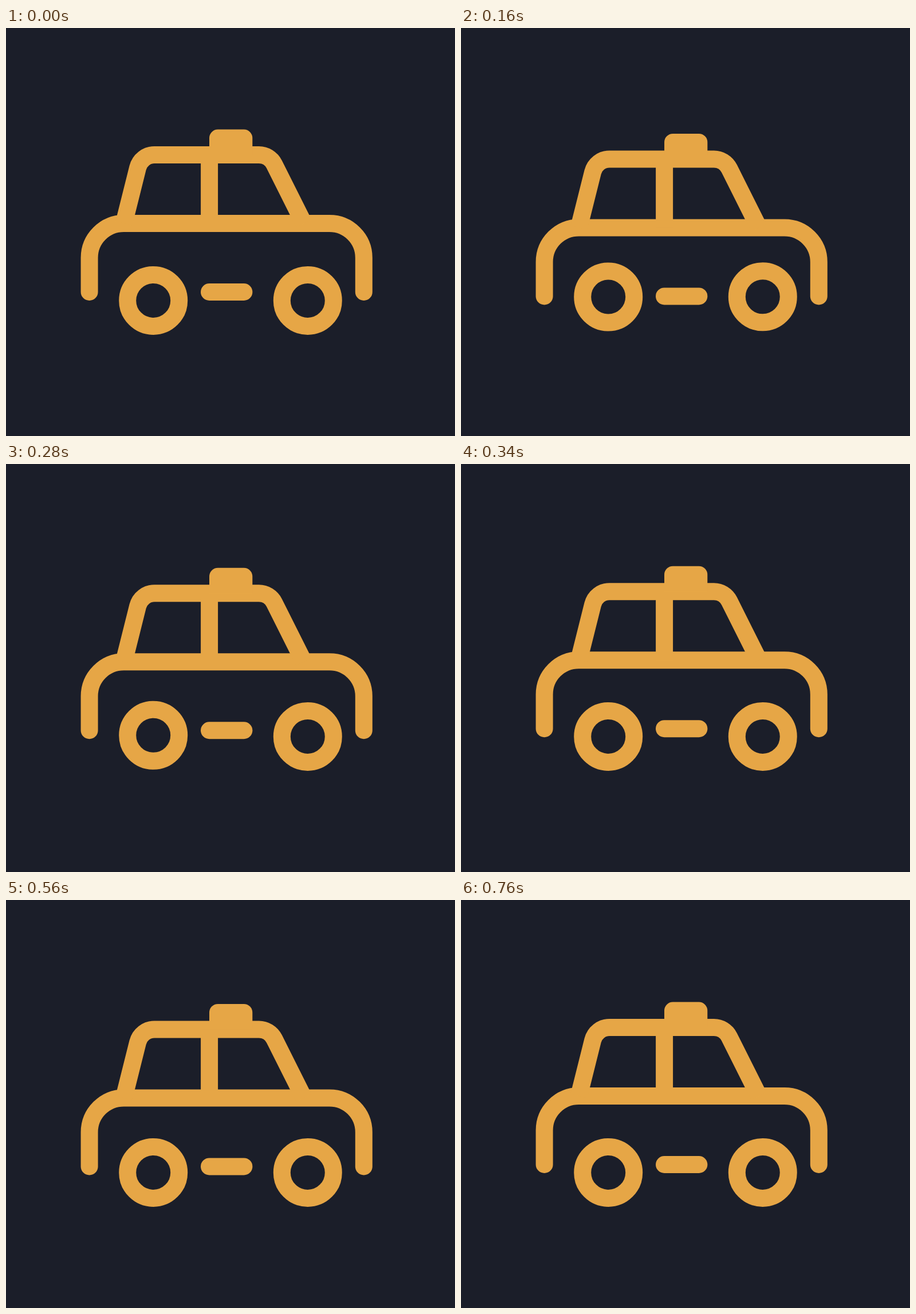
These frames come from a looping animation (784x714 px, 1.18 s). An HTML page:

```html
<!DOCTYPE html>
<html lang="en">
<head>
<meta charset="utf-8">
<title>Taxi</title>
<style>
  html, body { margin: 0; width: 100%; height: 100%; overflow: hidden; background: #1b1e29; }
  svg { display: block; width: 100%; height: 100%; }
  .line { fill: none; stroke: #e6a646; stroke-width: 30; }
  .round { stroke-linecap: round; }
  .lamp { fill: #e6a646; }
  #body { transform-origin: 385px 383px; }
</style>
</head>
<body>
<svg viewBox="0 0 784 714">
  <g id="body">
    <path class="line round" d="M145.6 462V402A60 60 0 0 1 205.6 342H564.8A60 60 0 0 1 624.8 402V462"/>
    <path class="line" d="M205.8 342L230.1 244.7A30 30 0 0 1 259.2 222H441.6A30 30 0 0 1 468.4 238.6L520.1 342"/>
    <path class="line" d="M355.1 222V342"/>
    <path class="line round" d="M355 462H415.4"/>
    <path class="lamp" d="M355 222V192.5A15 15 0 0 1 370 177.5H415.3A15 15 0 0 1 430.3 192.5V222Z"/>
  </g>
  <circle id="rear" class="line" cx="257.2" cy="476.9" r="45"/>
  <circle id="front" class="line" cx="526.8" cy="476.9" r="45"/>
</svg>
<script>
  const LOOP = 1180;
  const EASE = 'cubic-bezier(.333, 0, .667, 1)';

  // steps: [time in ms, value]; the last value holds until the loop restarts
  function move(id, prop, format, steps) {
    const held = [...steps, [LOOP, steps[steps.length - 1][1]]];
    const frames = held.map(([time, value]) => ({
      offset: time / LOOP, [prop]: format(value), easing: EASE
    }));
    document.getElementById(id).animate(frames, { duration: LOOP, iterations: Infinity });
  }

  const down = y => `0px ${y}px`;
  const turn = a => `${a}deg`;

  move('body', 'translate', down, [
    [0, 0], [170, 7.5], [207, 7.5], [355, 1], [360, 1], [560, 4.4], [760, 1]
  ]);
  move('body', 'rotate', turn, [[0, 0], [85, 0.45], [170, 0]]);
  move('front', 'translate', down, [[0, 0], [133, -7.5], [267, 0]]);
  move('rear', 'translate', down, [[0, 0], [60, 0], [193, -7.5], [330, 0]]);
</script>
</body>
</html>
```
